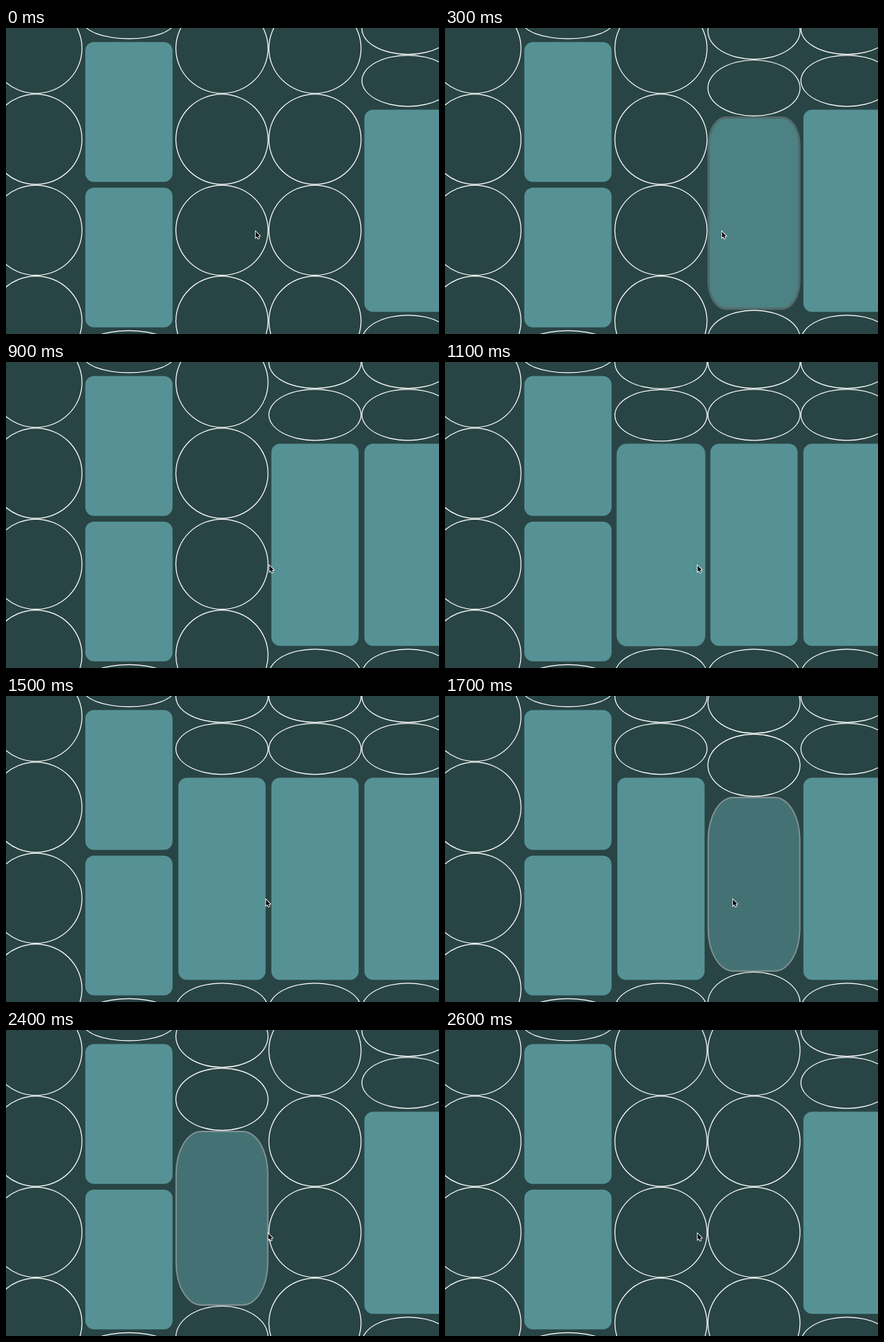
An HTML page with a canvas for the animation above (2800 ms loop, 600 by 425 pixels).

```html
<!DOCTYPE html>
<html lang="en">
<head>
<meta charset="utf-8">
<title>Flexing tiles</title>
<style>
html, body { margin: 0; width: 100%; height: 100%; overflow: hidden; background: #294445; }
canvas { display: block; width: 600px; height: 425px; }
</style>
</head>
<body>
<canvas id="stage" width="600" height="425"></canvas>
<script>
const ctx = document.getElementById('stage').getContext('2d');
const LOOP = 2800, STEP = 100, FADE = 240;
const LEFT = -23, TOP = -35, COL_W = 128.9, COL_H = 505.4;
const COLS = 5, ROWS = 4, GROW = 4, RADIUS = 16, BORDER = 4, LINE = 1.2;
const CURSOR_Y = 282.8;

const bezier = (s, a, b) => 3 * a * s * (1 - s) ** 2 + 3 * b * s * s * (1 - s) + s ** 3;

// CSS "ease"
function ease(x) {
  if (x <= 0) return 0;
  if (x >= 1) return 1;
  let lo = 0, hi = 1;
  for (let i = 0; i < 24; i++) {
    const mid = (lo + hi) / 2;
    if (bezier(mid, .25, .25) < x) lo = mid; else hi = mid;
  }
  return bezier(lo, .1, 1);
}

// Smooth progress of a hand movement
function glide(t, from, to) {
  const k = Math.min(1, Math.max(0, (t - from) / (to - from)));
  return k * k * (3 - 2 * k);
}

const toggle = (t, open, close) => ease((t - open) / FADE) - ease((t - close) / FADE);

// How far a tile is open, from 0 to 1
function openness(col, row, t) {
  if (col === 1) return row === 1 || row === 2 ? 1 : 0;
  if (col === 0 || row !== 2) return 0;
  if (col === 2) return toggle(t, 900, 2340);
  if (col === 3) return toggle(t, 180, 1640);
  return 1;
}

function box(x, y, w, h, rx, ry, inset) {
  const r = { x: Math.max(0, rx - inset), y: Math.max(0, ry - inset) };
  ctx.roundRect(x + inset, y + inset, w - 2 * inset, h - 2 * inset, r);
}

// p runs from a white outline (0) to a filled tile (1)
function tile(x, y, w, h, p) {
  const rx = w / 2 * (1 - p) + RADIUS * p;
  const ry = h / 2 * (1 - p) + RADIUS * p;
  const border = Math.max(LINE, Math.floor(1 + (BORDER - 1) * p));
  if (p > 0) {
    ctx.beginPath();
    box(x, y, w, h, rx, ry, border);
    ctx.fillStyle = `rgba(86, 146, 149, ${p})`;
    ctx.fill();
  }
  if (p < 1) {
    ctx.beginPath();
    box(x, y, w, h, rx, ry, 0);
    box(x, y, w, h, rx, ry, border);
    ctx.fillStyle = `rgba(255, 255, 255, ${1 - p})`;
    ctx.fill('evenodd');
  }
}

function column(col, t) {
  const cells = Array.from({ length: ROWS }, (_, row) => openness(col, row, t));
  const grow = cells.map(p => 1 + (GROW - 1) * p);
  const unit = COL_H / grow.reduce((a, b) => a + b);
  let y = TOP;
  cells.forEach((p, row) => {
    const h = unit * grow[row];
    tile(LEFT + col * COL_W, y, COL_W, h, p);
    y += h;
  });
}

// Two sweeps right and back
function cursorX(t) {
  return 346 + 40 * glide(t, 0, 350) - 36 * glide(t, 650, 1100)
    + 52 * glide(t, 1400, 1750) - 52 * glide(t, 2100, 2550);
}

const ARROW = new Path2D('M0 0V8.3L1.9 6.6 3.3 9.8 4.7 9.1 3.4 6.1 5.8 5.9Z');

function cursor(x, y) {
  ctx.save();
  ctx.translate(x, y);
  ctx.lineWidth = 1.6;
  ctx.strokeStyle = '#fff';
  ctx.stroke(ARROW);
  ctx.fillStyle = '#000';
  ctx.fill(ARROW);
  ctx.restore();
}

function draw(now) {
  // Motion advances at ten poses a second
  const t = Math.floor((now % LOOP) / STEP) * STEP;
  ctx.fillStyle = '#294445';
  ctx.fillRect(0, 0, 600, 425);
  for (let col = 0; col < COLS; col++) column(col, t);
  cursor(cursorX(t), CURSOR_Y);
}

let start;
function tick(now) {
  start ??= now;
  draw(now - start);
  requestAnimationFrame(tick);
}
requestAnimationFrame(tick);
</script>
</body>
</html>
```
